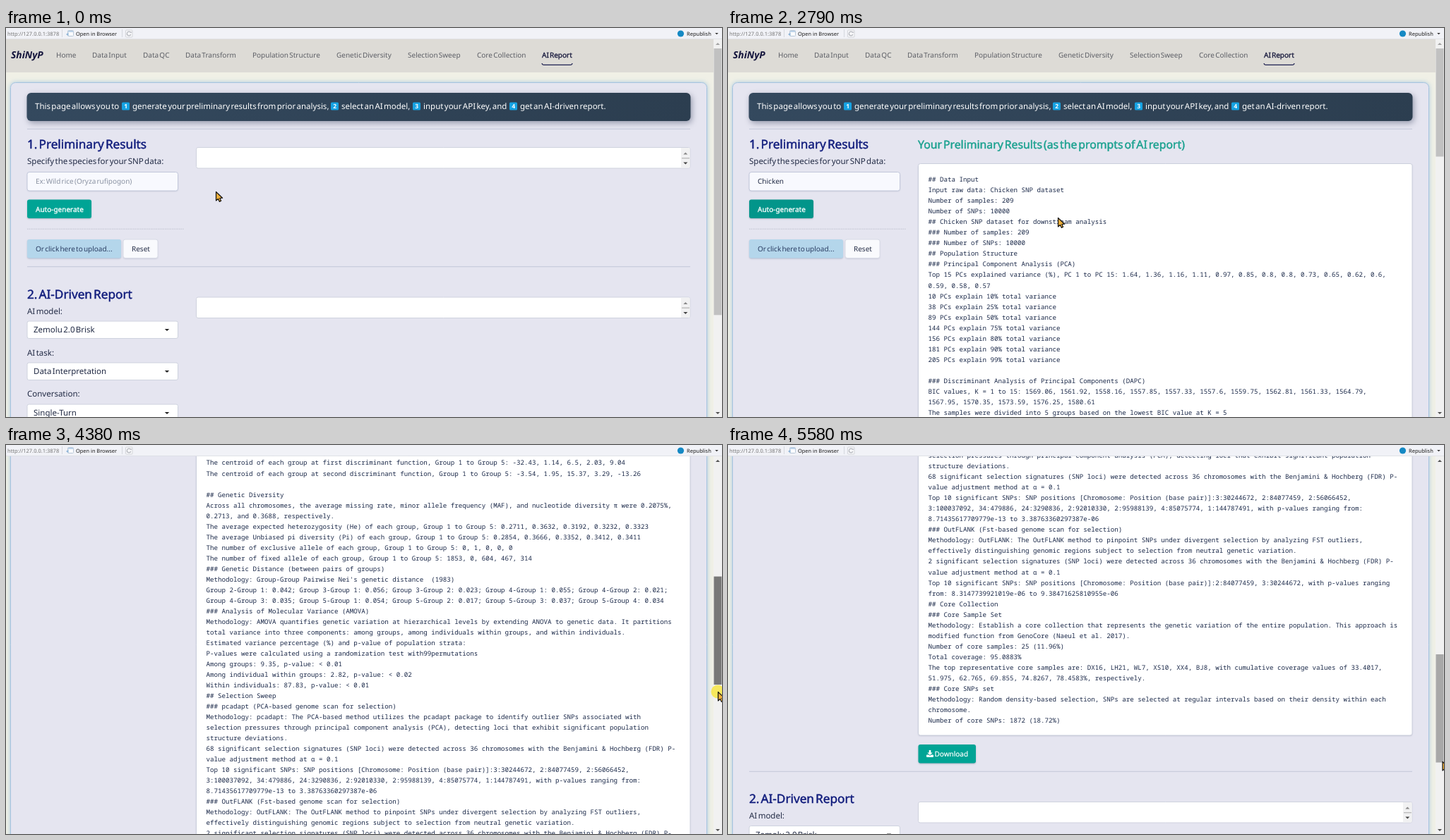
An HTML page with a canvas that plays this animation: 1014 px wide and 552 px high, repeating every 8.4 s.

```html
<!DOCTYPE html>
<html lang="en">
<head>
<meta charset="utf-8">
<title>AI Report</title>
<style>
html, body { margin: 0; width: 100%; height: 100%; overflow: hidden; background: #f0f0e8; }
canvas { display: block; width: 1014px; height: 552px; }
</style>
</head>
<body>
<canvas id="stage"></canvas>
<script>
const W = 1014, H = 552, LOOP = 8400, GROWTH = 1060.5;
const SANS = '"Noto Sans", "Open Sans", sans-serif';
const MONO = '"Noto Sans Mono", "DejaVu Sans Mono", monospace';
const INK = '#222b45', NAVY = '#101c7c', TEAL = '#00a495';
const canvas = document.getElementById('stage');
const dpr = window.devicePixelRatio || 1;
canvas.width = W * dpr;
canvas.height = H * dpr;
const c = canvas.getContext('2d');
c.textRendering = 'geometricPrecision';

const REPORT = `## Data Input
Input raw data: Chicken SNP dataset
Number of samples: 209
Number of SNPs: 10000
## Chicken SNP dataset for downstream analysis
### Number of samples: 209
### Number of SNPs: 10000
## Population Structure
### Principal Component Analysis (PCA)
Top 15 PCs explained variance (%), PC 1 to PC 15: 1.64, 1.36, 1.16, 1.11, 0.97, 0.85, 0.8, 0.8, 0.73, 0.65, 0.62, 0.6,
0.59, 0.58, 0.57
10 PCs explain 10% total variance
38 PCs explain 25% total variance
89 PCs explain 50% total variance
144 PCs explain 75% total variance
156 PCs explain 80% total variance
181 PCs explain 90% total variance
205 PCs explain 99% total variance

### Discriminant Analysis of Principal Components (DAPC)
BIC values, K = 1 to 15: 1569.06, 1561.92, 1558.16, 1557.85, 1557.33, 1557.6, 1559.75, 1562.81, 1561.33, 1564.79,
1567.95, 1570.35, 1573.59, 1576.25, 1580.61
The samples were divided into 5 groups based on the lowest BIC value at K = 5
The number of samples in each group, Group 1 to Group 5: 54, 38, 41, 29, 47
The centroid of each group at first discriminant function, Group 1 to Group 5: -32.43, 1.14, 6.5, 2.03, 9.04
The centroid of each group at second discriminant function, Group 1 to Group 5: -3.54, 1.95, 15.37, 3.29, -13.26

## Genetic Diversity
Across all chromosomes, the average missing rate, minor allele frequency (MAF), and nucleotide diversity π were 0.2075%,
0.2713, and 0.3688, respectively.
The average expected heterozygosity (He) of each group, Group 1 to Group 5: 0.2711, 0.3632, 0.3192, 0.3232, 0.3323
The average Unbiased pi diversity (Pi) of each group, Group 1 to Group 5: 0.2854, 0.3666, 0.3352, 0.3412, 0.3411
The number of exclusive allele of each group, Group 1 to Group 5: 0, 1, 0, 0, 0
The number of fixed allele of each group, Group 1 to Group 5: 1853, 0, 604, 467, 314
### Genetic Distance (between pairs of groups)
Methodology: Group-Group Pairwise Nei's genetic distance  (1983)
Group 2-Group 1: 0.042; Group 3-Group 1: 0.056; Group 3-Group 2: 0.023; Group 4-Group 1: 0.055; Group 4-Group 2: 0.021;
Group 4-Group 3: 0.035; Group 5-Group 1: 0.054; Group 5-Group 2: 0.017; Group 5-Group 3: 0.037; Group 5-Group 4: 0.034
### Analysis of Molecular Variance (AMOVA)
Methodology: AMOVA quantifies genetic variation at hierarchical levels by extending ANOVA to genetic data. It partitions
total variance into three components: among groups, among individuals within groups, and within individuals.
Estimated variance percentage (%) and p-value of population strata:
P-values were calculated using a randomization test with99permutations
Among groups: 9.35, p-value: < 0.01
Among individual within groups: 2.82, p-value: < 0.02
Within individuals: 87.83, p-value: < 0.01
## Selection Sweep
### pcadapt (PCA-based genome scan for selection)
Methodology: pcadapt: The PCA-based method utilizes the pcadapt package to identify outlier SNPs associated with
selection pressures through principal component analysis (PCA), detecting loci that exhibit significant population
structure deviations.
68 significant selection signatures (SNP loci) were detected across 36 chromosomes with the Benjamini & Hochberg (FDR) P-
value adjustment method at α = 0.1
Top 10 significant SNPs: SNP positions [Chromosome: Position (base pair)]:3:30244672, 2:84077459, 2:56066452,
3:100037092, 34:479886, 24:3290836, 2:92010330, 2:95988139, 4:85075774, 1:144787491, with p-values ranging from:
8.71435617709779e-13 to 3.38763360297387e-06
### OutFLANK (Fst-based genome scan for selection)
Methodology: OutFLANK: The OutFLANK method to pinpoint SNPs under divergent selection by analyzing FST outliers,
effectively distinguishing genomic regions subject to selection from neutral genetic variation.
2 significant selection signatures (SNP loci) were detected across 36 chromosomes with the Benjamini & Hochberg (FDR) P-
value adjustment method at α = 0.1
Top 10 significant SNPs: SNP positions [Chromosome: Position (base pair)]:2:84077459, 3:30244672, with p-values ranging
from: 8.3147739921019e-06 to 9.38471625810955e-06
## Core Collection
### Core Sample Set
Methodology: Establish a core collection that represents the genetic variation of the entire population. This approach is
modified function from GenoCore (Naeul et al. 2017).
Number of core samples: 25 (11.96%)
Total coverage: 95.0883%
The top representative core samples are: DX16, LH21, WL7, XS10, XX4, BJ8, with cumulative coverage values of 33.4017,
51.975, 62.765, 69.855, 74.8267, 78.4583%, respectively.
### Core SNPs set
Methodology: Random density-based selection, SNPs are selected at regular intervals based on their density within each
chromosome.
Number of core SNPs: 1872 (18.72%)`.split('\n');

const NAV = [['Home', 71], ['Data Input', 122], ['Data QC', 194], ['Data Transform', 254],
  ['Population Structure', 349], ['Genetic Diversity', 468], ['Selection Sweep', 569],
  ['Core Collection', 667]];
const INTRO = [['This page allows you to', 41], ['generate your preliminary results from prior analysis,', 179],
  ['select an AI model,', 475], ['input your API key, and', 591], ['get an AI-driven report.', 728]];

// y is the middle of the capitals
function text(s, x, y, size, color, { weight = 0, font = SANS, style = '', gap = -0.14 } = {}) {
  c.font = `${style} ${size}px ${font}`;
  c.wordSpacing = gap * size + 'px';
  c.fillStyle = color;
  c.fillText(s, x, y + size * 0.36);
  if (weight) {
    c.strokeStyle = color;
    c.lineWidth = weight;
    c.strokeText(s, x, y + size * 0.36);
  }
}

function box(x, y, w, h, r, fill, border, shadow) {
  c.save();
  c.beginPath();
  c.roundRect(x, y, w, h, r);
  if (shadow) [c.shadowColor, c.shadowBlur, c.shadowOffsetX, c.shadowOffsetY] = shadow;
  c.fillStyle = fill;
  c.fill();
  c.restore();
  if (border) {
    c.strokeStyle = border;
    c.lineWidth = 1;
    c.stroke();
  }
}

function rect(x, y, w, h, color) {
  c.fillStyle = color;
  c.fillRect(x, y, w, h);
}

function poly(points, fill, stroke, width = 1) {
  c.beginPath();
  points.forEach(([x, y]) => c.lineTo(x, y));
  c.closePath();
  c.fillStyle = fill;
  c.fill();
  if (stroke) {
    c.strokeStyle = stroke;
    c.lineWidth = width;
    c.lineJoin = 'round';
    c.stroke();
  }
}

function tri(x, y, size, dir, color) {
  poly([[x - size, y - dir * size / 2], [x + size, y - dir * size / 2], [x, y + dir * size / 2]], color);
}

function disc(x, y, r, color) {
  c.beginPath();
  c.arc(x, y, r, 0, 7);
  c.fillStyle = color;
  c.fill();
}

const mix = (a, b, k) => a + (b - a) * k;

// eased progress in n hard steps, the first at a, the last at b
function steps(t, a, b, n) {
  const k = Math.max(0, Math.min(n, Math.floor((t - a) / (b - a) * (n - 1) + 1.001))) / n;
  return k * k * (3 - 2 * k);
}

const DRAG = [[3780, 0, 181], [4380, 550.3, 350], [4780, 786, 414.5], [5180, 936, 449]];

function drag(t) {
  const q = Math.max(3780, Math.min(5180, 3780 + 100 * Math.floor((t - 3777) / 100.2)));
  const i = DRAG.findIndex((k, n) => n && q <= k[0]);
  const [a, b] = [DRAG[i - 1], DRAG[i]];
  const k = (q - a[0]) / (b[0] - a[0]);
  return { scroll: mix(a[1], b[1], k), y: mix(a[2], b[2], k) };
}

function pointer(t) {
  if (t < 1670) {
    const k = steps(t, 100, 460, 5);
    return { x: mix(297, 208, k), y: mix(232, 222, k), kind: k > 0.6 ? 'beam' : 'arrow' };
  }
  if (t < 2680) {
    const k = steps(t, 1670, 2280, 7), y = mix(222, 254, k);
    return { x: mix(208, 98, k), y, kind: y < 231 ? 'beam' : y < 244 ? 'arrow' : 'hand' };
  }
  if (t < 2780) return { x: 150, y: 260, kind: 'arrow' };
  if (t < 2870) return { x: 467, y: 269, kind: 'arrow' };
  if (t < 3170) return null;
  if (t < 3780) {
    const k = steps(t, 3170, 3370, 3);
    return { x: mix(1013, 1009, k), y: mix(196, 181, k), kind: 'arrow' };
  }
  return { x: t < 5580 ? 1008 : 1011.5, y: drag(t).y, kind: 'arrow' };
}

function drawPointer({ x, y, kind }, pressed) {
  if (pressed) disc(x, y, 9.5, 'rgba(250,228,30,.7)');
  c.save();
  c.translate(x, y);
  if (kind === 'arrow') {
    poly([[0.5, 0.5], [0.5, 13], [3.4, 10.4], [5.4, 14.4], [7.6, 13.3], [5.8, 9.5], [9.6, 9.2]],
      '#efb03c', '#111', 1.2);
  } else if (kind === 'beam') {
    const bars = (g, color) => {
      rect(-4 - g, -7 - g, 8 + 2 * g, 2 + 2 * g, color);
      rect(-4 - g, 5 - g, 8 + 2 * g, 2 + 2 * g, color);
      rect(-1 - g, -6, 2 + 2 * g, 12, color);
    };
    bars(0.4, '#111');
    rect(-0.5, -5, 1, 10, '#d8c48a');
  } else {
    poly([[0, 1], [1.6, 0], [2.8, 1], [3, 5], [7, 6.2], [8, 8], [7, 12], [6, 14.5], [0, 14.5],
      [-4, 9.5], [-3.4, 8], [-0.5, 9]], '#f7c22f', '#3b2a08', 0.8);
  }
  c.restore();
}

function toolbar() {
  rect(0, 0, W, 15.5, '#f1f2f7');
  rect(0, 15, W, 0.7, '#dcdde2');
  const opt = { gap: 0 };
  text('http://127.0.0.1:3878', 2, 8.5, 7.5, '#777', opt);
  rect(79, 2, 0.8, 11, '#cfd1d8');
  rect(164, 2, 0.8, 11, '#cfd1d8');
  box(87.5, 3.5, 8, 8, 1, '#fbfcfe', '#b9c8d8');
  rect(88, 4, 7, 1.8, '#b8d0e8');
  poly([[85, 9], [88.5, 6.5], [88.5, 11.5]], '#8fb4d6');
  text('Open in Browser', 99, 8.5, 7.4, '#1c1c1c', opt);
  box(169.5, 3, 9.5, 10, 1, '#f7f7f9', '#d3d5da');
  c.beginPath();
  c.arc(174.2, 8, 2.8, 0.4, 5.6);
  c.strokeStyle = '#b5b8bf';
  c.lineWidth = 1.2;
  c.stroke();
  tri(177, 6.4, 1.8, 1, '#b5b8bf');
  disc(955.5, 8, 4.6, '#1589c4');
  text('Republish', 964, 8.5, 7.5, '#1c1c1c', opt);
  tri(1006.5, 8.2, 2.3, 1, '#333');
}

function header() {
  rect(0, 15.5, 1002, 47.5, '#dddbd6');
  text('ShiNyP', 7, 38, 13.8, '#14143c', { style: 'italic bold' });
  NAV.forEach(([s, x]) => text(s, x, 38.5, 10, '#5d5f66'));
  text('AI Report', 759, 38.5, 10, '#14163a', { weight: 0.3 });
  c.beginPath();
  c.moveTo(759, 50);
  c.quadraticCurveTo(759.3, 52.4, 762, 52.4);
  c.lineTo(799, 52.4);
  c.quadraticCurveTo(801.7, 52.4, 802, 50);
  c.strokeStyle = '#1d2050';
  c.lineWidth = 1.2;
  c.stroke();
}

function banner() {
  const g = c.createLinearGradient(30, 92, 969, 132);
  g.addColorStop(0, '#34495e');
  g.addColorStop(1, '#2c3e50');
  box(29.5, 92, 940, 40, 6, g, null, ['rgba(30,40,70,.4)', 8, 2, 3]);
  INTRO.forEach(([s, x], i) => {
    text(s, x, 111, 11.5, '#fff');
    if (!i) return;
    box(x - 15, 105.5, 11, 11, 1.5, '#16a2e2');
    text(String(i), x - 11.8, 111, 8.5, '#fff', { style: 'bold' });
  });
}

function emptyArea(y) {
  box(269.5, y, 699.5, 29.5, 2.5, '#fff', '#cfd2de');
  rect(956, y + 0.6, 12.5, 28.3, '#f1f1f2');
  tri(962.3, y + 8.5, 3, -1, '#888');
  rect(957, y + 14.5, 11, 1.4, '#bcbcbc');
  tri(962.3, y + 22.5, 3, 1, '#444');
}

function select(s, y) {
  box(30, y - 12, 213.5, 24.5, 2.5, '#fff', '#ced2de');
  text(s, 39, y, 11.5, INK);
  tri(228, y + 0.5, 3.2, 1, '#222');
}

function species(t) {
  const focused = t >= 670 && t < 2380, fading = t >= 2380 && t < 2470;
  const glow = focused ? ['rgba(70,150,225,.6)', t < 770 ? 2 : 5, 0, 0] : ['rgba(60,70,110,.15)', 2, 0, 1];
  box(30, 204.5, 213.5, 26.5, 3, '#f8f9fe', focused ? '#5a9fd8' : fading ? '#8fb4dc' : '#c2c8da', glow);
  if (t < 1480) text('Ex: Wild rice (Oryza rufipogon)', 42, 217.5, 10, '#8a92a2');
  else text('Chicken', 42, 217.5, 10, INK);
  const blink = t < 1480 ? t < 1180 : (t - 1480) % 1060 < 530;
  if (focused && blink) rect(t < 1480 ? 42 : 78.5, 210, 1, 15.5, '#222');
}

function sectionOne(t, ready) {
  rect(30, 142.8, 939, 0.9, '#bfc4d6');
  text('1. Preliminary Results', 30, 164.5, 17.2, NAVY, { weight: 0.45 });
  text('Specify the species for your SNP data:', 30, 189, 11.5, INK);
  species(t);
  const fill = t < 2180 || t >= 2870 ? TEAL : t >= 2380 && t < 2470 ? '#046b60' : t < 2680 ? '#048779' : '#02958a';
  box(30, 243.5, 91, 26.5, 3, fill, null, ['rgba(40,60,90,.3)', 2, 0, 1]);
  text('Auto-generate', 42, 257, 10, '#fff', { weight: 0.3 });
  c.setLineDash([1.5, 1]);
  c.beginPath();
  c.moveTo(30, 285.2);
  c.lineTo(252, 285.2);
  c.strokeStyle = '#bbc0cc';
  c.lineWidth = 0.9;
  c.stroke();
  c.setLineDash([]);
  box(30, 300, 133, 26.5, 3, '#b4d6eb', null, ['rgba(60,90,130,.3)', 2, 0, 1]);
  text('Or click here to upload...', 42, 313.5, 10, '#2b3e63');
  box(166, 300, 49, 26.5, 3, '#f9fafd', '#d9dce6', ['rgba(60,70,110,.2)', 2, 0, 1]);
  text('Reset', 178, 313.5, 10, INK);
  if (!ready) return emptyArea(169.5);
  text('Your Preliminary Results (as the prompts of AI report)', 269, 165.5, 15.8, '#1aa18f', { weight: 0.45 });
  box(269.5, 192.5, 699.5, 1155.5, 3, '#fff', '#cbcfdc', ['rgba(60,70,110,.2)', 2, 0, 1]);
  REPORT.forEach((s, i) => text(s, 283.6, 215 + i * 15.02, 9.17, '#1c2a4a', { font: MONO, gap: 0 }));
  box(269.5, 1361, 81.5, 26.5, 3, TEAL, null, ['rgba(40,60,90,.3)', 2, 0, 1]);
  rect(284.7, 1369, 2.6, 4, '#fff');
  tri(286, 1374.5, 3.6, 1, '#fff');
  box(281, 1375.5, 10, 3.5, 1, '#fff');
  tri(286, 1375.4, 3.4, 1, TEAL);
  tri(286, 1374.4, 3.4, 1, '#fff');
  text('Download', 292.5, 1374.5, 10, '#fff', { weight: 0.2 });
}

function sectionTwo() {
  rect(30, 338.3, 939, 0.9, '#bfc4d6');
  text('2. AI-Driven Report', 30, 377.5, 17.2, NAVY, { weight: 0.45 });
  text('AI model:', 30, 401.5, 11.5, INK);
  select('Zemolu 2.0 Brisk', 428);
  text('AI task:', 30, 460.5, 11.5, INK);
  select('Data Interpretation', 487);
  text('Conversation:', 30, 519, 11.5, INK);
  select('Single-Turn', 546);
  emptyArea(382);
}

function scrollbar(t, scroll, pageHeight) {
  rect(1002, 15.5, 12, H, '#f1f1f1');
  tri(1008, 22.5, 3, -1, scroll ? '#505050' : '#a0a0a0');
  tri(1008, 546.5, 3, 1, '#505050');
  const k = 511 / pageHeight;
  const color = t < 3170 ? '#c1c1c1' : t < 3570 || t >= 5580 ? '#a8a8a8' : '#787878';
  rect(1002.5, 29 + scroll * k, 11, 536 * k, color);
}

function draw(t) {
  const ready = t >= 2470, shift = ready ? GROWTH : 0;
  const pageHeight = 724 + shift, { scroll } = drag(t);
  c.setTransform(dpr, 0, 0, dpr, 0, 0);
  rect(0, 0, W, H, '#f0f0e6');
  c.save();
  c.beginPath();
  c.rect(0, 15.5, W, H);
  c.clip();
  c.translate(0, -scroll);
  header();
  box(6.5, 77.5, 986, pageHeight - 72, 7, '#e5e5f0', '#a4c3df', ['rgba(100,165,220,.6)', 6 * dpr, 0, 0]);
  banner();
  sectionOne(t, ready);
  c.translate(0, shift);
  sectionTwo();
  c.restore();
  scrollbar(t, scroll, pageHeight);
  toolbar();
  const p = pointer(t);
  const pressed = t >= 670 && t < 770 || t >= 2380 && t < 2470 || t >= 3570 && t < 5580;
  if (p) drawPointer(p, pressed);
}

let start;
function frame(now) {
  start ??= now;
  draw((now - start) % LOOP);
  requestAnimationFrame(frame);
}
requestAnimationFrame(frame);
</script>
</body>
</html>
```
